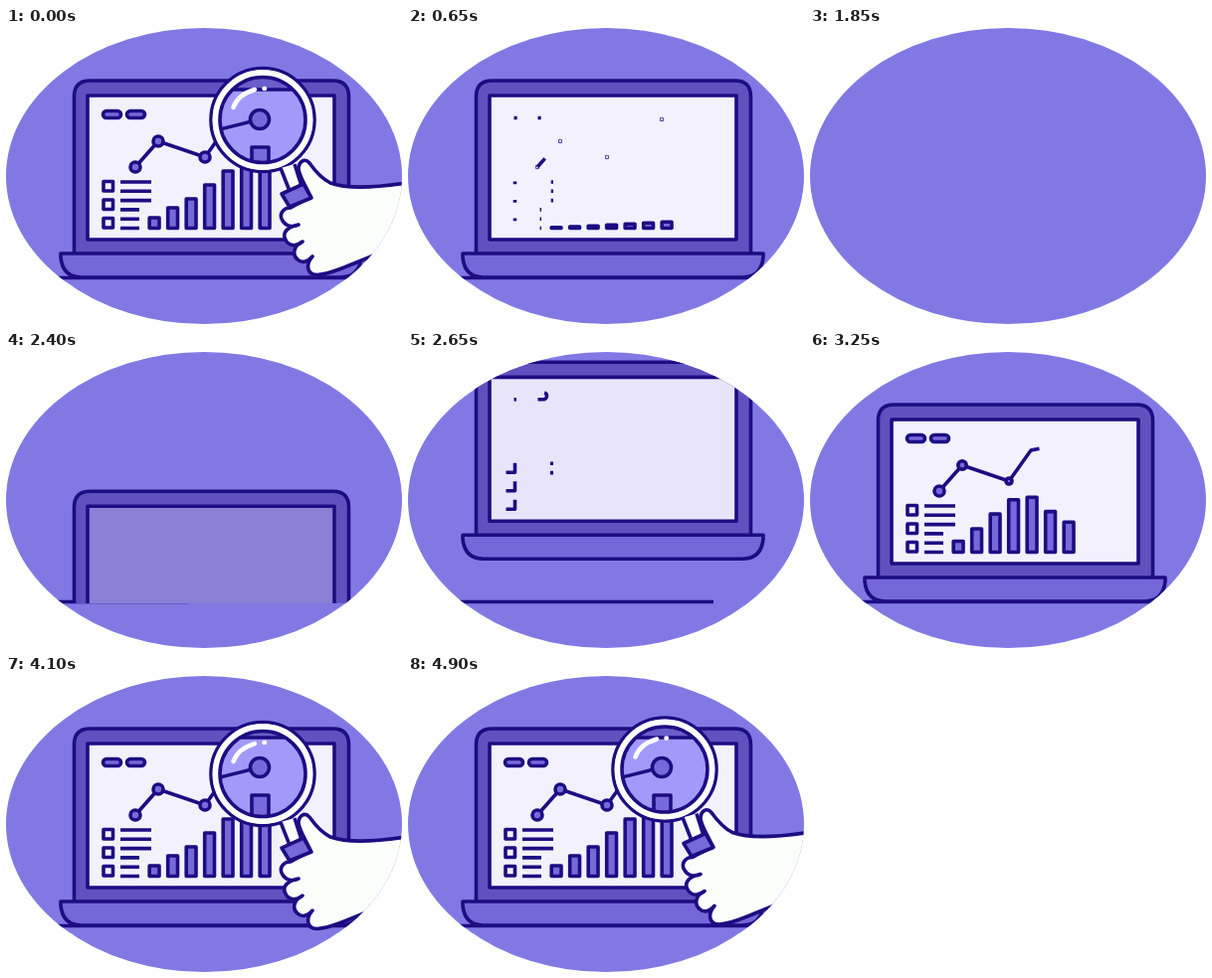
Animation, 398 px wide and 298 px high, one loop 4.95 s. Source, as an HTML page:

```html
<!DOCTYPE html>
<html lang="en">
<head>
<meta charset="utf-8">
<title>Laptop analytics</title>
<style>
  html, body { margin: 0; width: 100%; height: 100%; overflow: hidden; background: #fff; }
  svg { display: block; width: 100%; height: 100%; }
  .ink { stroke: #1c0d82; stroke-width: 3.6; stroke-linejoin: round; }
  .line { fill: none; }
  .bar { fill: #7669da; }
  .white { fill: #fcfefc; }
</style>
</head>
<body>
<svg viewBox="0 0 398 298">
  <defs>
    <clipPath id="stage"><ellipse cx="199" cy="149" rx="199" ry="149" shape-rendering="crispEdges"/></clipPath>
    <clipPath id="aboveGround"><rect width="398" height="253"/></clipPath>
    <clipPath id="lens"><circle id="lensHole" cx="258" cy="92.5" r="43"/></clipPath>
  </defs>
  <g clip-path="url(#stage)">
    <rect width="398" height="298" fill="#8178e3"/>
    <path id="ground" class="ink line"/>
    <g clip-path="url(#aboveGround)">
      <g id="laptop">
        <path id="lid" class="ink" fill="#5f52be"/>
        <path id="screen" class="ink"/>
        <g id="chart"></g>
        <path class="ink" fill="#7467d7" d="M55 227H357V231Q355 251 336 251H76Q57 251 55 231Z"/>
      </g>
    </g>
    <g id="glassBack">
      <circle cx="258" cy="92.5" r="52" class="ink white"/>
      <path class="ink white" d="M276 141L285 164L297 159L290 137"/>
      <circle cx="258" cy="92.5" r="47.5" fill="none" stroke="#fcfefc" stroke-width="6"/>
    </g>
    <g clip-path="url(#lens)">
      <rect width="398" height="298" fill="#a29afb"/>
      <path fill="#6a5ecb" d="M100 0H398V62H100Z"/>
      <path class="ink line" d="M100 62H398M205 104.500L255 92"/>
      <circle cx="255" cy="92" r="9.500" class="ink bar"/>
      <rect x="247" y="120" width="17" height="90" class="ink bar"/>
    </g>
    <g id="glassFront">
      <circle cx="258" cy="92.5" r="43" class="ink line"/>
      <path fill="none" stroke="#fff" stroke-width="4.500" stroke-linecap="round"
            d="M228.500 80Q233 67 250 62M259.500 61h.5"/>
      <path class="ink white" d="M430 151C380 161 345 163 326 156C316 151 310 143 305 136
        C300 130 294 135 294 142C295 150 301 158 306 170L286 181C278 181 274 188 278 194
        C281 199 287 201 294 198C280 201 277 208 282 215C286 220 292 220 298 215
        C288 220 288 229 293 233C297 237 303 236 308 230C301 238 303 246 309 248
        C316 250 330 245 340 241L372 228L430 206Z"/>
      <path class="ink bar" d="M277 167L299 157L307 171L285 180Z"/>
    </g>
  </g>
</svg>
<script>
const LOOP = 4950, STEP = 50, HINGE = 228;
const $ = id => document.getElementById(id);
const clamp = v => Math.min(1, Math.max(0, v));
const span = (t, from, to) => clamp((t - from) / (to - from));
const smooth = p => p * p * (3 - 2 * p);
const mix = (a, b, p) => a + (b - a) * p;
const backOut = (p, s) => p <= 0 ? 0 : 1 + (s + 1) * (p - 1) ** 3 + s * (p - 1) ** 2;

// Smoothly interpolates [time, value] stops.
function track(t, stops) {
  if (t <= stops[0][0]) return stops[0][1];
  for (let i = 1; i < stops.length; i++) {
    const [t0, a] = stops[i - 1], [t1, b] = stops[i];
    if (t <= t1) return mix(a, b, smooth(span(t, t0, t1)));
  }
  return stops[stops.length - 1][1];
}

function add(tag, attrs) {
  const el = document.createElementNS('http://www.w3.org/2000/svg', tag);
  for (const name in attrs) el.setAttribute(name, attrs[name]);
  return $('chart').appendChild(el);
}

const strokes = [];
function addStroke(d, start, duration, fill = 'none') {
  const el = add('path', { d, class: 'ink', pathLength: 1, fill });
  strokes.push({ el, start, duration, fill });
}

const pill = (x, start) => addStroke(
  `M${x + 9.5} 90.5h5.500a3.5 3.5 0 0 0 0 -7h-11a3.5 3.5 0 0 0 0 7Z`, start, 260, '#7669da');
pill(97, 2635);
pill(121, 2560);
for (let i = 0; i < 3; i++) addStroke(`M107.500 ${154.500 + 18.500 * i}v9.500h-9.500v-9.500Z`, 2560, 185);
for (let i = 0; i < 6; i++) {
  const right = i < 3 ? 146 : 134;
  addStroke(`M${right} ${155 + 9.300 * i}H115`, i < 2 ? 2630 : 2650 + 40 * i, 200);
}

const barTops = [191, 181, 172, 158, 144, 131, 118];
const barStarts = [2900, 2950, 3056, 3115, 3165, 3207, 3225];
const bars = barTops.map((top, i) => ({
  el: add('rect', { class: 'ink bar', x: 144.200 + 18.500 * i, width: 9.800 }),
  height: 201.500 - top, start: barStarts[i]
}));

addStroke('M130 140L153 114L200 130L222 99L255 92', 2900, 417);
const dots = [[130, 140, 3000], [153, 114, 3185], [200, 130, 3210], [255, 92, 3320]]
  .map(([cx, cy, start]) => ({ el: add('circle', { cx, cy, class: 'ink bar' }), start }));

function drawChart(t) {
  const leaving = t < 2000;
  const left = 1 - smooth(span(t, 300, 720));
  $('chart').style.display = leaving && left === 0 ? 'none' : '';
  for (const { el, start, duration, fill } of strokes) {
    const p = leaving ? left : span(t, start, start + duration);
    el.style.visibility = p > 0 ? '' : 'hidden';
    el.style.strokeDasharray = p < 1 ? `${p} 2` : 'none';
    el.style.fill = p < 1 ? 'none' : fill;
  }
  for (const { el, height, start } of bars) {
    const h = height * (leaving ? left : backOut(span(t, start, start + 400), 3.4));
    el.setAttribute('y', 201.5 - h);
    el.setAttribute('height', h);
    el.style.visibility = h > 0 ? '' : 'hidden';
  }
  for (const { el, start } of dots) {
    const p = leaving ? left : backOut(span(t, start, start + 250), 1.7);
    el.setAttribute('r', 5 * p);
    el.style.visibility = p > 0 ? '' : 'hidden';
  }
}

function drawLid(t) {
  const fold = t < 2000 ? smooth(span(t, 725, 1290)) : 0;
  const c = Math.cos(fold * Math.PI / 2);
  const h = 175 * c, top = HINGE - h;
  const flare = Math.min(1.3, (1 - c) / 0.42);
  const l = 68.5 - 9 * flare, r = 344.5 + 9 * flare, k = Math.min(16, h / 3);
  const visible = c > 0.02 ? '' : 'none';
  $('lid').style.display = $('screen').style.display = visible;
  $('lid').setAttribute('d', `M68.5 ${HINGE}L${l} ${top + k}Q${l} ${top} ${l + k} ${top}` +
    `H${r - k}Q${r} ${top} ${r} ${top + k}L344.5 ${HINGE}Z`);
  const st = HINGE - h * (0.914 - 0.24 * (1 - c)), sb = HINGE - 15 * c ** 0.9;
  $('screen').setAttribute('d', `M${82 - 9 * flare} ${st}H${330 + 9 * flare}L330 ${sb}H82Z`);
  const lit = t < 2000 ? 1 - smooth(span(t, 700, 1020)) : span(t, 2300, 2680);
  const rgb = [[101, 243], [88, 241], [200, 254]].map(([a, b]) => Math.round(mix(a, b, lit)));
  $('screen').style.fill = `rgb(${rgb})`;
}

function drawHand(t) {
  const x = track(t, t < 2000 ? [[50, 0], [600, 230]] : [[3270, 230], [3790, 0]]);
  const y = track(t, t < 2000
    ? [[50, 0], [300, -31], [600, 0]]
    : [[3270, 0], [3710, -22], [3980, 12], [4200, 1.5], [4900, 1.5], [4950, 0]]);
  const move = `translate(${x} ${y})`;
  for (const id of ['glassBack', 'glassFront', 'lensHole']) {
    $(id).setAttribute('transform', move);
    $(id).style.display = x < 230 ? '' : 'none';
  }
}

function draw(t) {
  const y = track(t, t < 2000
    ? [[945, 0], [1495, 32]]
    : [[2150, 210], [2660, -43], [2950, 0]]);
  $('laptop').setAttribute('transform', `translate(0 ${y})`);
  $('laptop').style.display = t >= 1500 && t < 2150 ? 'none' : '';
  const from = t < 2000 ? mix(50, 350, span(t, 1588, 1850)) : 50;
  const to = t < 2000 ? 350 : mix(50, 350, span(t, 2130, 2737));
  $('ground').setAttribute('d', `M${from} 251.500H${to}`);
  $('ground').style.display = t >= 1850 && t < 2150 ? 'none' : '';
  drawLid(t);
  drawChart(t);
  drawHand(t);
}

const began = performance.now();
function frame() {
  const t = (performance.now() - began) % LOOP;
  draw(Math.floor(t / STEP) * STEP);
  requestAnimationFrame(frame);
}
frame();
</script>
</body>
</html>
```
